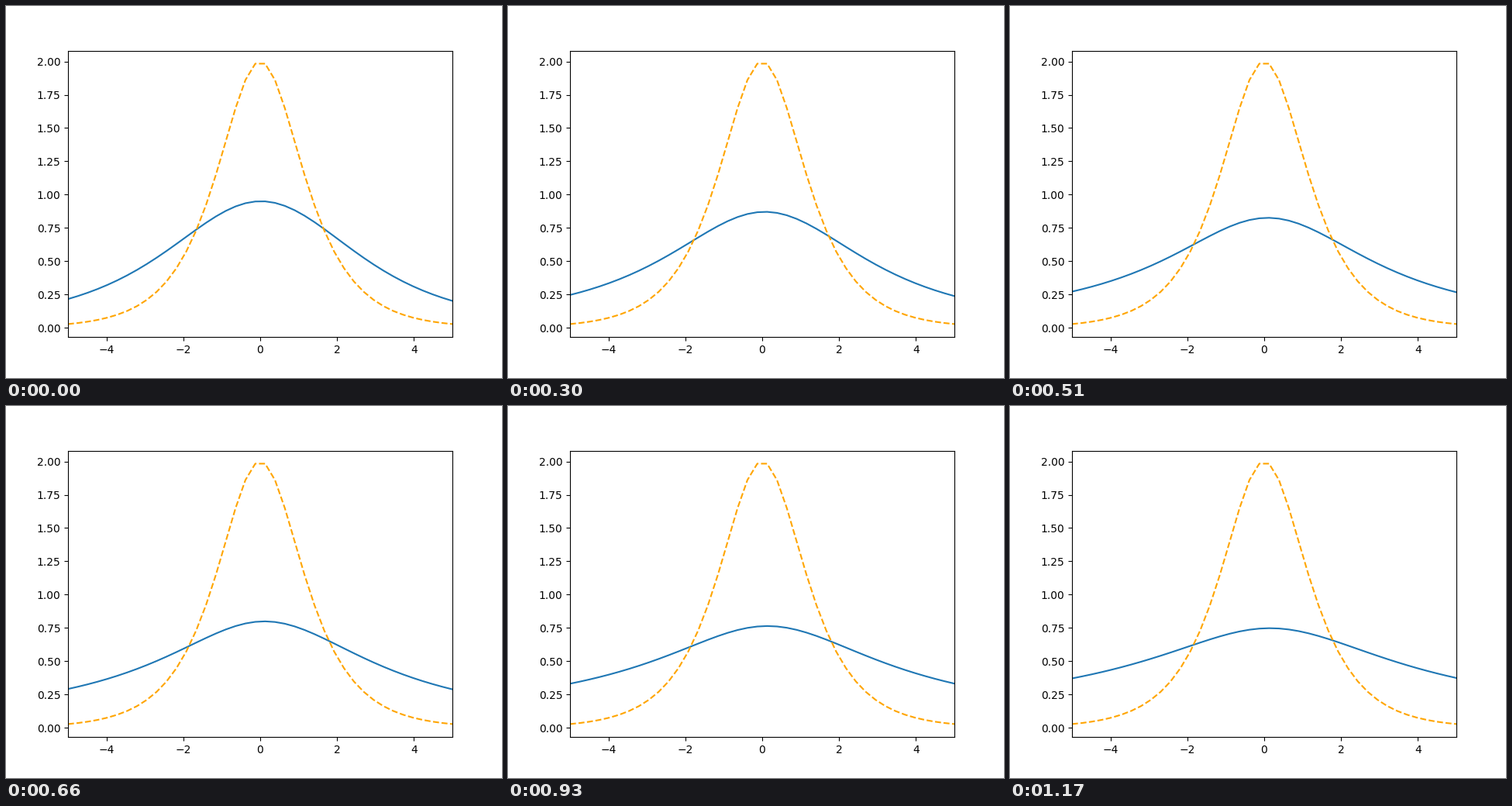
These frames come from a looping animation (640 px wide and 480 px high, 1200 ms). A matplotlib script:

```python
import numpy as np
import matplotlib.pyplot as plt
from matplotlib.animation import FuncAnimation

FRAMES = 40
INTERVAL = 30

x = np.linspace(-5, 5, 40)


def flank(dist, reach, top, end, power):
    """Bell flank falling from top to end over the given reach."""
    k = ((top / end) ** (1 / power) - 1) / reach**2
    return top / (1 + k * dist**2) ** power


def bell(t):
    """Bell at t seconds: it sinks, spreads and drifts a little right."""
    top = 0.746 + 0.204 * (1 - t / 1.25) ** 1.8
    mid = 0.02 + 0.18 * t - 0.06 * t**2
    left_end = 0.215 + 0.0915 * t + 0.035 * t**2
    right_end = 0.201 + 0.112 * t + 0.030 * t**2
    power = 0.4 + 1.2 * np.exp(-1.9 * t)

    d = x - mid
    left = flank(d, 5 + mid, top, left_end, power)
    right = flank(d, 5 - mid, top, right_end, 1.16 * power)
    return np.where(d < 0, left, right)


fig, ax = plt.subplots(figsize=(6.4, 4.8), dpi=100)
curve, = ax.plot(x, bell(0), color="tab:blue", lw=1.5)
ax.plot(x, 2 / np.cosh(x), "--", color="orange", lw=1.5)
ax.set_xlim(-5, 5)


def update(i):
    curve.set_ydata(bell(i * INTERVAL / 1000))
    return curve,


anim = FuncAnimation(fig, update, frames=FRAMES, interval=INTERVAL,
                     repeat=True, repeat_delay=0)
plt.show()
```
